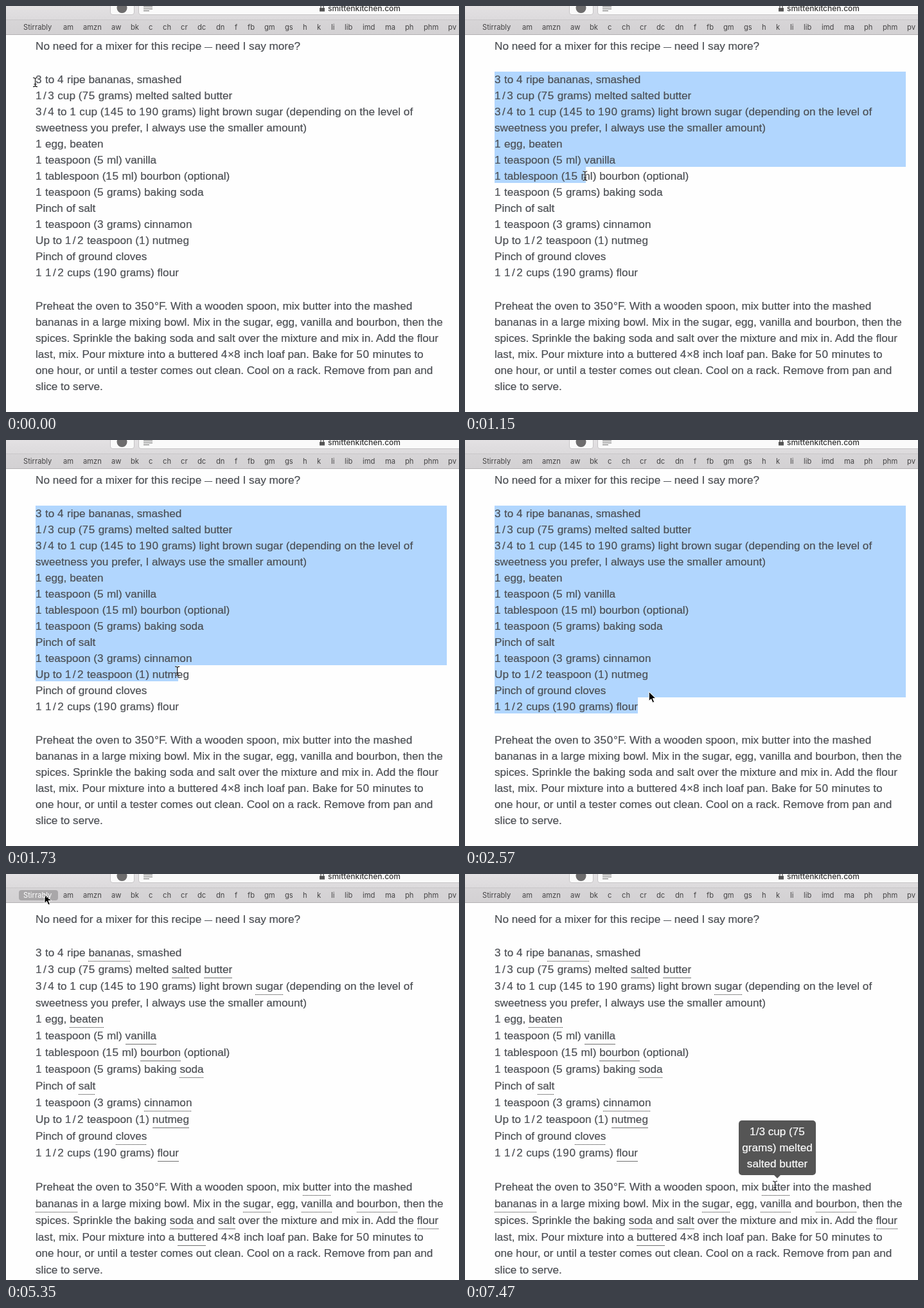
Write an HTML page that moves like this. It is 705x631 px and loops after 8000 ms.

```html
<!DOCTYPE html>
<html lang="en">
<head>
<meta charset="utf-8">
<title>Recipe page</title>
<style>
html, body { margin: 0; width: 100%; height: 100%; overflow: hidden; }
#stage {
  position: relative; width: 705px; height: 631px; overflow: hidden;
  background: #fefefe; color: #4b4e53;
  font: 17.15px/25px "Liberation Sans", Arial, sans-serif;
}
#stage div, #bar span, #bar i, #stage > svg { position: absolute; }
#bar {
  left: 0; top: 0; width: 705px; height: 44px; overflow: hidden;
  background: linear-gradient(#e3e1e3, #dcdadc 21px, #c9c7c9 21px 22px, #d7d5d7 22px, #d3d1d3);
  border-bottom: 1px solid #b3b1b3;
  font: 11.2px/14px Inter, sans-serif; color: #454445;
}
#bar span { white-space: nowrap; top: 26px; }
#bar .field { background: #fafafa; border: 1px solid #c5c3c5; border-radius: 4px; top: -10px; height: 22px; }
#bar .host { left: 501px; top: -3px; font-size: 12px; font-weight: 500; color: #333; }
#bar svg { position: absolute; left: 0; top: 0; }
#pill { left: 20px; top: 25px; width: 61px; height: 16px; border-radius: 4px; background: #a9a7a9; }
#text, #tip { -webkit-text-stroke: .2px; }
.line { left: 46px; white-space: pre; }
.line b { font-weight: 400; letter-spacing: .7px; }
.line s { text-decoration: none; letter-spacing: 2.5px; }
.line em { font-style: normal; font-size: 12px; }
.line u { position: relative; text-decoration: none; }
.marked u::after {
  content: ""; position: absolute; left: 0; right: 0; top: 23px; height: 1px;
  background: repeating-linear-gradient(90deg, #222 0 1px, transparent 1px 2px);
}
.marked u.solid::after { background: #707070; }
.sel { left: 46px; background: #b1d6fe; }
#tip {
  left: 426px; top: 383px; width: 120px; height: 80px; padding-top: 5px;
  border-radius: 5px; background: #555; color: #fff; text-align: center; white-space: pre;
}
#tip::after {
  content: ""; position: absolute; left: 55px; top: 85px;
  border: 5px solid transparent; border-top-color: #555; border-bottom: 0;
}
#cursor { left: 0; top: 0; overflow: visible; }
</style>
</head>
<body>
<div id="stage">
  <div class="sel" id="rows"></div>
  <div class="sel" id="tail"></div>
  <div id="text"></div>
  <div id="bar">
    <i class="field" style="left:162px;width:36px"></i>
    <i class="field" style="left:206px;width:520px"></i>
    <svg width="705" height="44">
      <circle cx="180.500" cy="3" r="8" fill="#6d6c6d"/>
      <path d="M214 1.500h14M214 4.500h14M214 7.500h9" stroke="#666" fill="none"/>
      <path d="M488 3h8v5.500h-8z" fill="#555"/>
      <path d="M490 4V1a2 2 0 0 1 4 0v3" stroke="#555" stroke-width="1.300" fill="none"/>
    </svg>
    <span class="host">smittenkitchen.com</span>
    <div id="pill"></div>
  </div>
  <div id="tip">1/3 cup (75
grams) melted
salted butter</div>
  <svg id="cursor" width="1" height="1">
    <defs>
      <path id="caret" d="M-3.500 -7Q0 -7 0 -5Q0 -7 3.500 -7M0 -5V5M-3.500 7Q0 7 0 5Q0 7 3.500 7M-2 3H2"/>
    </defs>
    <path id="arrow" d="M0 0V14.500L3.400 11.300 5.800 17 8.400 15.900 6 10.400H10.800Z" fill="#000" stroke="#fff" stroke-width="1"/>
    <g id="beam" fill="none" transform="translate(.5 .5)">
      <use href="#caret" stroke="#fff" stroke-opacity=".6" stroke-width="2.600"/>
      <use href="#caret" stroke="#111" stroke-width="1.100"/>
    </g>
  </svg>
</div>
<script>
const $ = id => document.getElementById(id);
const LOOP = 8000, LEFT = 46, RIGHT = 686, MARK_AT = 5350;

const labels = "Stirrably am amzn aw bk c ch cr dc dn f fb gm gs h k li lib imd ma ph phm pv".split(" ");
const labelX = [27, 89, 120, 164, 194, 222, 244, 272, 298, 327, 356, 376, 402, 434, 462, 484, 506, 527, 555, 590, 621, 650, 688];
const tabs = labels.map((name, i) => {
  const tab = document.createElement("span");
  tab.textContent = name;
  tab.style.left = labelX[i] + "px";
  return $("bar").appendChild(tab);
});

// [word] gets a dotted underline, {word} a solid one
const blocks = [
  { plain: 68, marked: 76.05, text: "No need for a mixer for this recipe — need I say more?" },
  { plain: 120, marked: 127.85, text: `3 to 4 ripe [bananas], smashed
1/3 cup (75 grams) melted {salt}ed {butter}
3/4 to 1 cup (145 to 190 grams) light brown [sugar] (depending on the level of
sweetness you prefer, I always use the smaller amount)
1 egg, [beaten]
1 teaspoon (5 ml) {vanilla}
1 tablespoon (15 ml) {bourbon} (optional)
1 teaspoon (5 grams) baking [soda]
Pinch of [salt]
1 teaspoon (3 grams) [cinnamon]
Up to 1/2 teaspoon (1) {nutmeg}
Pinch of ground [cloves]
1 1/2 cups (190 grams) {flour}` },
  { plain: 472, marked: 491.85, text: `Preheat the oven to 350°F. With a wooden spoon, mix [butter] into the mashed
[bananas] in a large mixing bowl. Mix in the [sugar], egg, [vanilla] and [bourbon], then the
spices. Sprinkle the baking {soda} and {salt} over the mixture and mix in. Add the [flour]
last, mix. Pour mixture into a {butter}ed 4×8 inch loaf pan. Bake for 50 minutes to
one hour, or until a tester comes out clean. Cool on a rack. Remove from pan and
slice to serve.` }
];

const markup = s => s
  .replace(/(\d)\/(\d)/g, "<s>$1/</s>$2")
  .replace(/\d+(?!\/)/g, "<b>$&</b>")
  .replace("—", "<em>—</em>")
  .replace(/\[(\w+)\]/g, "<u>$1</u>")
  .replace(/\{(\w+)\}/g, '<u class="solid">$1</u>');

const lines = blocks.flatMap(block => block.text.split("\n").map((s, i) => {
  const el = document.createElement("div");
  el.className = "line";
  el.innerHTML = markup(s);
  $("text").appendChild(el);
  return { el, plain: block.plain + 25 * i, marked: Math.round(block.marked + 25.9 * i) };
}));
const ingredients = lines.slice(1, 14);

// start, end, steps, x, y
const moves = [
  [480, 770, 4, 129, 205],
  [1010, 1230, 4, 243.5, 322],
  [1500, 2100, 9, 296, 407],
  [2570, 3350, 14, 69, 41],
  [3410, 3700, 5, 60, 31],
  [6010, 6540, 8, 363, 348],
  [6900, 7470, 10, 482, 484]
];

const clamp = (v, lo, hi) => Math.min(hi, Math.max(lo, v));
const ease = p => p * (1 + 3 * p - 2 * p * p) / 2;

function progress(t, [start, end, steps]) {
  if (t < start) return 0;
  const step = Math.floor((t - start) / (end - start) * (steps - 1) + 1e-6) + 1;
  return ease(Math.min(step, steps) / steps);
}

function pointerAt(t) {
  let x = 45, y = 118;
  for (const move of moves) {
    const p = progress(t, move);
    x += (move[3] - x) * p;
    y += (move[4] - y) * p;
  }
  return { x, y };
}

function box(el, top, width, height) {
  el.style.top = top + "px";
  el.style.width = Math.max(0, width) + "px";
  el.style.height = Math.max(0, height) + "px";
}

function drawSelection(t) {
  const shown = t >= 480 && t < MARK_AT;
  $("rows").hidden = $("tail").hidden = !shown;
  if (!shown) return;
  const { x, y } = pointerAt(Math.min(t, 2100));
  const row = clamp(Math.floor((y - 104) / 25), 0, 12);
  const top = Math.max(102, 100 + 25 * row);
  box($("rows"), 102, RIGHT - LEFT, top - 102);
  box($("tail"), top, Math.min(x + 1.5 - LEFT, ingredients[row].el.offsetWidth), 125 + 25 * row - top);
}

function overText({ x, y }) {
  return lines.some(({ el, marked }) =>
    y > marked - 13 && y < marked + 4 && x > LEFT && x < LEFT + el.offsetWidth);
}

function draw(t) {
  const marked = t >= MARK_AT;
  $("text").className = marked ? "marked" : "";
  for (const line of lines)
    line.el.style.top = (marked ? line.marked : line.plain) - 18 + "px";
  drawSelection(t);

  const pos = pointerAt(t);
  const hover = pos.x > 20 && pos.x < 81 && pos.y > 25 && pos.y < 40.9;
  $("pill").style.display = hover ? "block" : "none";
  tabs[0].style.color = hover ? "#fff" : "";

  const beam = t < 2570 || (marked && overText(pos));
  $("beam").style.display = beam ? "" : "none";
  $("arrow").style.display = beam ? "none" : "";
  $("cursor").style.transform = `translate(${pos.x}px, ${pos.y}px)`;
  $("tip").style.opacity = clamp((progress(t, moves[6]) - .7) / .3, 0, 1);
}

const begin = performance.now();
function tick() {
  draw((performance.now() - begin) % LOOP);
  requestAnimationFrame(tick);
}
tabs[0].style.zIndex = 1;
tick();
</script>
</body>
</html>
```
